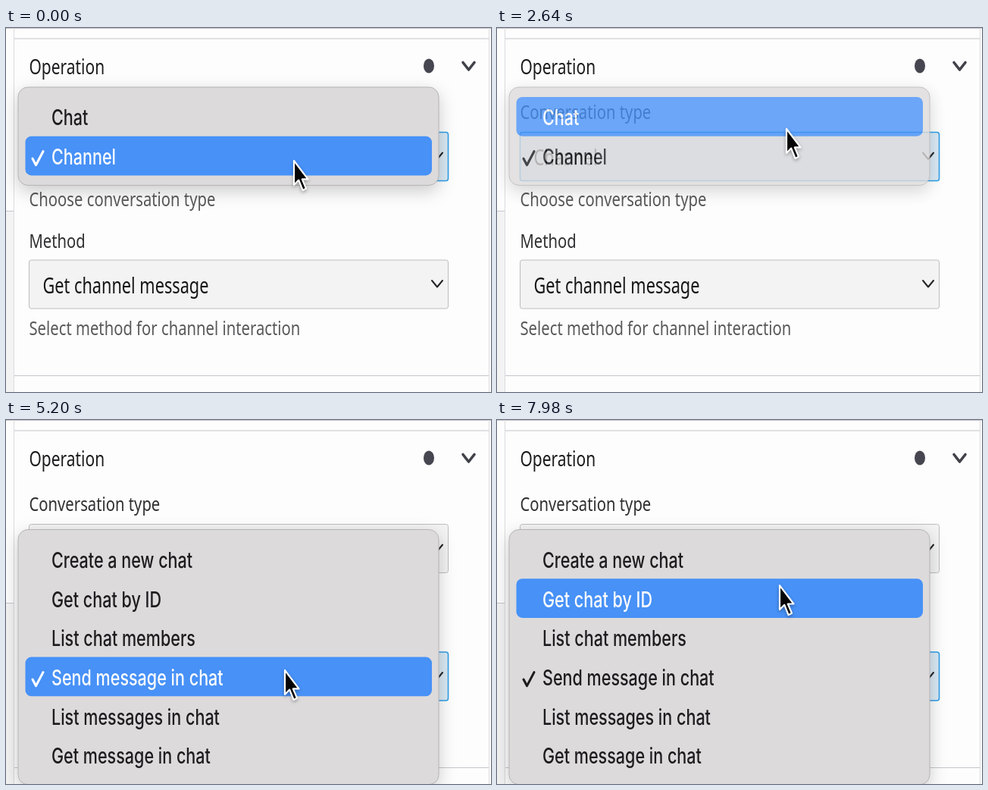
Recreate the animation shown at these times as an HTML page. Size 640 by 480 pixels, loop 8 s.

```html
<!DOCTYPE html>
<html lang="en">
<head>
<meta charset="utf-8">
<title>Choosing an operation</title>
<style>
  html, body { margin: 0; width: 100%; height: 100%; overflow: hidden; background: #fdfdfd; }
  svg { display: block; width: 100%; height: 100%; }
  text { font-family: "Noto Sans", "Open Sans", sans-serif; font-size: 26.3px; fill: #303032; white-space: pre; }
  .title { font-size: 27.2px; font-weight: 500; fill: #1c1c1e; }
  .hint { fill: #59595b; }
  .value { font-size: 28.2px; fill: #161618; }
  .item text { font-family: Inter, sans-serif; font-size: 28px; font-weight: 500; fill: #1d1c1e; }
  .item .bar { fill: none; }
  .item .tick { stroke: #1d1c1e; }
  .item.on .bar { fill: #4791f7; }
  .item.on text { fill: #fdfdfd; }
  .item.on .tick { stroke: #fdfdfd; }
  .line { fill: none; stroke: #c4c4cc; }
  .stroke { fill: none; stroke-linecap: round; stroke-linejoin: round; }
  .panel { fill: #dddadb; stroke: #b6b4b6; filter: drop-shadow(0 7px 11px rgba(0, 0, 0, .2)); }
  .field { fill: #f3f3f3; stroke: #bdbdbf; }
  .field.focus { fill: #d9effa; stroke: #87989f; }
  .field.open { fill: #d9e9f4; stroke: #2f9fe8; stroke-width: 1.6; }
</style>
</head>
<body>
<svg id="stage" viewBox="0 0 640 480" preserveAspectRatio="none">
  <rect width="640" height="480" fill="#fdfdfd"/>
  <rect y="241" width="10" height="239" fill="#f3f3f4"/>
  <path class="line" d="M0 .5H640M10 14H637M11 458.5H637M0 241.5H10"/>
  <path class="line" d="M10.5 0V480M637.5 0V480" style="stroke:#dcdce0"/>
  <ellipse cx="558" cy="50" rx="7" ry="9.5" fill="#464650"/>
  <path class="stroke" d="M603 45.5l7.5 9.5l7.5-9.5" stroke="#41414a" stroke-width="3.6"/>
  <g id="form"></g>
  <g id="menus"></g>
  <g id="cursor">
    <path d="M0 1V33L6.2 26.6L11.6 40L16 37.6L10.8 25.4H18.5Z" fill="#050505" stroke="#fff"
      stroke-width="2.2" stroke-linejoin="round" style="filter:drop-shadow(0 2px 2px rgba(0,0,0,.3))"/>
  </g>
</svg>
<script>
const LOOP = 8000, SQUEEZE = 0.77, ROW = 51.7, PAD = 13;
const NS = 'http://www.w3.org/2000/svg';
const byId = id => document.getElementById(id);

function add(parent, tag, attrs = {}) {
  const node = document.createElementNS(NS, tag);
  for (const key in attrs) node.setAttribute(key, attrs[key]);
  return parent.appendChild(node);
}

function label(parent, x, y, content, cls = '') {
  const node = add(parent, 'text', { class: cls, transform: `translate(${x} ${y}) scale(${SQUEEZE} 1)` });
  node.textContent = content;
  return node;
}

function field(y) {
  const box = add(byId('form'), 'rect', { x: 30.5, y: y + .5, width: 553, height: 64, rx: 3 });
  add(byId('form'), 'path', {
    class: 'stroke', d: `M562 ${y + 27.5}l7 8.5l7-8.5`, stroke: '#232326', 'stroke-width': 2
  });
  return { box, value: label(byId('form'), 48.5, y + 44, '', 'value') };
}

function menu(top, names, checked) {
  const root = add(byId('menus'), 'g');
  add(root, 'rect', {
    class: 'panel', x: 16, y: top, width: 555, height: names.length * ROW + 2 * PAD, rx: 13
  });
  const items = names.map((name, i) => {
    const y = top + PAD + i * ROW;
    const item = add(root, 'g', { class: 'item' });
    add(item, 'rect', { class: 'bar', x: 25.5, y, width: 536.5, height: ROW, rx: 8 });
    if (i === checked) {
      add(item, 'path', { class: 'tick stroke', d: `M35 ${y + 29.5}l4.5 8.5l9.5-18`, 'stroke-width': 3.1 });
    }
    label(item, 60, y + 37.4, name);
    return item;
  });
  return {
    show(opacity, pointerY) {
      root.style.display = opacity > 0 ? '' : 'none';
      root.style.opacity = opacity;
      const hovered = Math.floor((pointerY - top - PAD) / ROW);
      items.forEach((item, i) => item.classList.toggle('on', i === hovered));
    }
  };
}

const form = byId('form');
label(form, 30.5, 61, 'Operation', 'title');
label(form, 30.5, 120, 'Conversation type');
label(form, 30.5, 235, 'Choose conversation type', 'hint');
label(form, 30.5, 290, 'Method');
const hint = label(form, 30.5, 405, '', 'hint');
const typeField = field(137);
const methodField = field(305.5);
const typeMenu = menu(78, ['Chat', 'Channel'], 1);
const methodMenu = menu(144.5, [
  'Create a new chat', 'Get chat by ID', 'List chat members',
  'Send message in chat', 'List messages in chat', 'Get message in chat'
], 3);

// time, x, y
const path = [
  [0, 380, 174], [200, 380, 174], [900, 382, 132], [2840, 382, 132], [3340, 384, 223],
  [4000, 368, 329], [6300, 368, 329], [7020, 370, 301], [LOOP, 373, 217]
];
const CLOSE = 2580, FADE = 300, OPEN = 4400;

function pointer(t) {
  const i = path.findIndex(p => p[0] > t);
  const [t0, x0, y0] = path[i - 1], [t1, x1, y1] = path[i];
  const u = (t - t0) / (t1 - t0), e = u * u * (3 - 2 * u);
  return [x0 + (x1 - x0) * e, y0 + (y1 - y0) * e];
}

function draw(now) {
  const t = now % LOOP;
  const [x, y] = pointer(t);
  byId('cursor').setAttribute('transform', `translate(${x} ${y})`);

  const chosen = t >= CLOSE + FADE, opened = t >= OPEN;
  typeMenu.show(Math.min(1, Math.max(0, 1 - (t - CLOSE) / FADE)), y);
  methodMenu.show(opened ? 1 : 0, y);

  typeField.value.textContent = chosen ? 'Chat' : 'Channel';
  methodField.value.textContent = chosen ? 'Send message in chat' : 'Get channel message';
  hint.textContent = `Select method for ${chosen ? 'chat' : 'channel'} interaction`;
  typeField.box.setAttribute('class', 'field ' + (opened ? '' : chosen ? 'focus' : 'open'));
  methodField.box.setAttribute('class', 'field ' + (opened ? 'open' : ''));
}

function tick() {
  draw(performance.now());
  requestAnimationFrame(tick);
}
tick();
</script>
</body>
</html>
```
